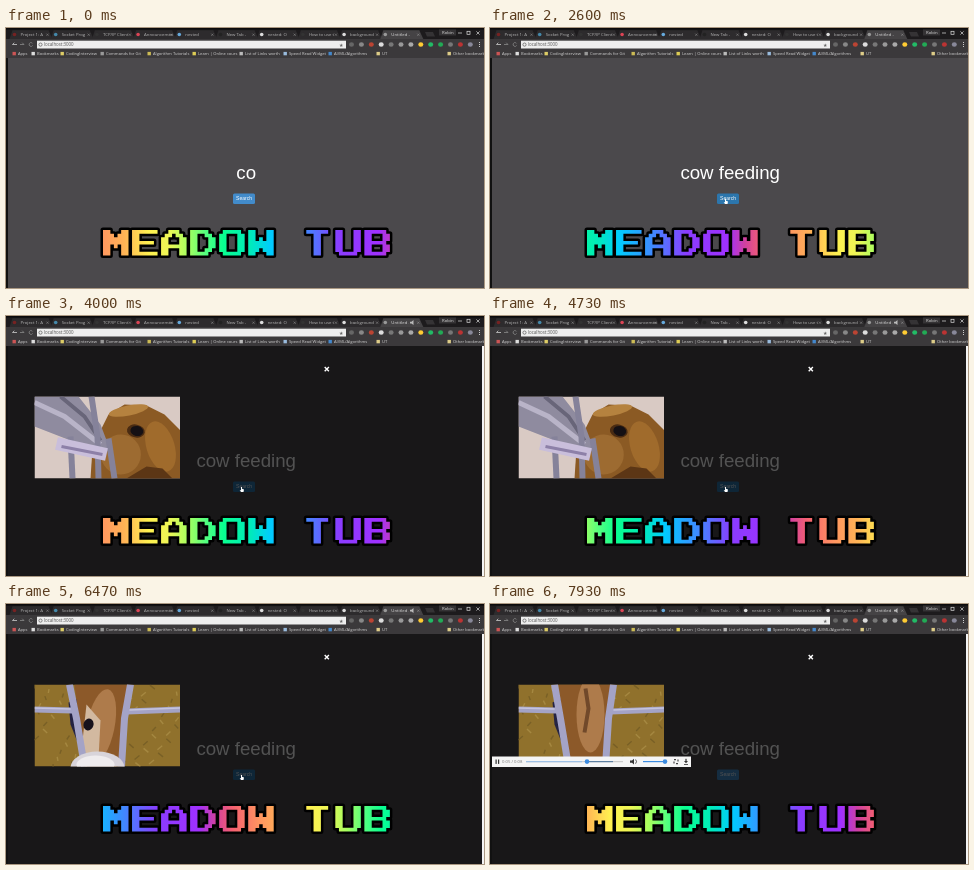
Write an HTML page with a canvas that moves like this. It is 478 by 260 pixels and loops after 8000 ms.

```html
<!DOCTYPE html>
<html lang="en">
<head>
<meta charset="utf-8">
<title>Search page</title>
<style>
html, body { margin: 0; width: 100%; height: 100%; overflow: hidden; background: #4b494c; }
canvas { display: block; width: 478px; height: 260px; }
</style>
</head>
<body>
<canvas id="stage" width="478" height="260"></canvas>
<script>
const ctx = document.getElementById('stage').getContext('2d');
const LOOP = 8000, FRAME = 200 / 3;
const SANS = '"Liberation Sans", Arial, sans-serif';
const UI = '"Open Sans", "Noto Sans", sans-serif';

const clamp = v => Math.max(0, Math.min(1, v));
const progress = (t, from, to) => clamp((t - from) / (to - from));
const ease = v => v * v * (3 - 2 * v);

function rect(x, y, w, h, color) {
  ctx.fillStyle = color;
  ctx.fillRect(x, y, w, h);
}
function ellipse(x, y, rx, ry, color, angle = 0) {
  ctx.fillStyle = color;
  ctx.beginPath();
  ctx.ellipse(x, y, rx, ry, angle, 0, 7);
  ctx.fill();
}
function polygon(points, color) {
  ctx.fillStyle = color;
  ctx.beginPath();
  points.forEach(p => ctx.lineTo(...p));
  ctx.fill();
}
function line(points, color, width = 1) {
  ctx.strokeStyle = color;
  ctx.lineWidth = width;
  ctx.beginPath();
  points.forEach(p => ctx.lineTo(...p));
  ctx.stroke();
}
function text(str, x, y, size, color, align = 'left', family = UI) {
  ctx.font = `${size}px ${family}`;
  ctx.textAlign = align;
  ctx.fillStyle = color;
  ctx.fillText(str, x, y);
}
function cross(x, y, r, color, width) {
  line([[x - r, y - r], [x + r, y + r]], color, width);
  line([[x - r, y + r], [x + r, y - r]], color, width);
}

// ---- Browser frame ----
const tabs = ['Project 1: A', 'Socket Prog', 'TCP/IP Client', 'Announcemen', 'nested',
  'New Tab - ', 'nested: O', 'How to use t', 'background', 'Untitled -'];
const tabIcons = ['#722', '#48a', '#333', '#d45', '#6ad', '#222', '#ddd', '#333', '#ddd', '#999'];
const bookmarks = [[12, 'Apps'], [31, 'Bookmarks'], [60, 'CodingInterview'], [100, 'Commands for Git'],
  [147, 'Algorithm Tutorials'], [192, 'Learn | Online cours'], [239, 'List of Links worth'],
  [283, 'Speed Read Widget'], [328, 'AI/ML/Algorithms'], [376, 'UT'], [447, 'Other bookmarks']];
const markIcons = ['#c55', '#ddd', '#dc6', '#999', '#cb5', '#dc5', '#bbb', '#9bd', '#48c', '#dc8', '#dc8'];
const toolIcons = ['#666', '#888', '#b43', '#ddd', '#777', '#999', '#aaa', '#fc3', '#2b6', '#2a5', '#777', '#b33', '#889'];

function drawTabShape(x, color) {
  polygon([[x - 4, 11], [x - 1, 2.3], [x + 35, 2.3], [x + 39, 11]], color);
}

function drawBrowser(t) {
  rect(0, 0, 478, 12, '#1d1b1d');
  rect(0, 0, 478, 1.5, '#0b0a0b');
  rect(0, 11, 478, 19, '#3b393b');
  polygon([[419, 4], [427, 4], [429, 8.5], [421, 8.5]], '#353335');
  rect(433, 1.5, 17, 6, '#353335');
  tabs.forEach((title, i) => {
    const x = 7.5 + i * 41.2, active = i === tabs.length - 1;
    drawTabShape(x, active ? '#454345' : '#2d2b2d');
    ellipse(x + 1, 6.5, 1.8, 1.8, tabIcons[i]);
    text(title, x + 7, 8.2, 4.3, active ? '#ddd' : '#b5b5b5');
    cross(x + 34, 6.7, 1.1, '#999', .5);
  });
  if (t > 3600) {
    rect(403, 3, 6, 7, '#454345');
    polygon([[404, 5.7], [405.5, 5.7], [407.5, 4], [407.5, 9], [405.5, 7.5], [404, 7.5]], '#bbb');
  }
  text('Robin', 436, 6.2, 4.3, '#ddd');
  line([[452, 5], [456, 5]], '#ddd', .7);
  ctx.strokeRect(461, 3.3, 3, 3);
  cross(472, 5, 1.6, '#ddd', .7);

  line([[11, 16.5], [6.5, 16.5], [8.3, 14.7]], '#ccc', .8);
  line([[14, 16.5], [18, 16.5], [16.2, 14.7]], '#888', .8);
  ctx.beginPath();
  ctx.arc(25, 16.5, 1.9, .5, 5.6);
  ctx.stroke();
  rect(31, 12.7, 309, 7.8, '#eee');
  ctx.strokeStyle = '#666';
  ctx.beginPath();
  ctx.arc(34.5, 16.6, 1.6, 0, 7);
  ctx.stroke();
  text('localhost:3000', 38, 18.2, 4.4, '#555');
  text('★', 333, 18.5, 5, '#666');
  toolIcons.forEach((color, i) => ellipse(345.5 + i * 9.9, 16.5, 2.5, 2.2, color));
  for (const y of [14, 16, 18]) rect(473, y, 1, 1, '#ccc');

  bookmarks.forEach(([x, label], i) => {
    rect(x - 5.5, 23.9, 3.4, 3.4, markIcons[i]);
    text(label, x, 27.3, 4.1, '#d5d5d5');
  });
}

// ---- Search form ----
const QUERY = 'cow feeding';

function drawForm(t) {
  const typed = QUERY.slice(0, 2 + Math.floor(t / 150));
  text(typed, 240.2, 151, 18.67, '#fff', 'center', SANS);
  if (t > 100 && t < 1900) {
    const end = 240.2 + ctx.measureText(typed).width / 2;
    rect(end, 133, .8, 22, '#ccc');
  }
  const hover = t > 2250 && t < 7250;
  ctx.fillStyle = hover ? '#2c76ad' : '#428bca';
  ctx.beginPath();
  ctx.roundRect(227, 165.5, 22, 10.5, 1.5);
  ctx.fill();
  text('Search', 238, 172.3, 5, '#fff', 'center', SANS);
}

function drawPointer(t) {
  if (t < 1950 || t > 7450) return;
  const arrive = ease(progress(t, 1950, 2300)), leave = ease(progress(t, 7200, 7450));
  const x = 256 - 21 * arrive - 90 * leave, y = 161 + 10 * arrive - 45 * leave;
  polygon([[x, y], [x + 1, y], [x + 1, y + 1.8], [x + 3, y + 2.6], [x + 2.5, y + 5],
    [x, y + 5], [x - 1.3, y + 3], [x, y + 3.2]], '#fff');
}

// ---- Pixel lettering with a travelling rainbow ----
const TITLE = 'MEADOW TUB', PIXEL = 3.63, WAVE = 340;
const glyphs = {
  M: [99, 119, 127, 127, 107, 99, 99],
  E: [127, 96, 96, 126, 96, 96, 127],
  A: [28, 54, 99, 99, 127, 99, 99],
  D: [124, 102, 99, 99, 99, 102, 124],
  O: [62, 99, 99, 99, 99, 99, 62],
  W: [99, 99, 107, 127, 127, 119, 99],
  T: [126, 24, 24, 24, 24, 24, 24],
  U: [99, 99, 99, 99, 99, 99, 62],
  B: [126, 99, 99, 126, 99, 99, 126],
};
const rainbow = [[0, '#ff9560'], [.07, '#ffb455'], [.14, '#fff050'], [.2, '#eef655'], [.26, '#a0ff60'],
  [.31, '#50ff80'], [.36, '#08ff90'], [.44, '#00eabb'], [.5, '#00ccff'], [.6, '#4088ff'], [.7, '#8a3cff'],
  [.82, '#a030ff'], [.87, '#d040a0'], [.92, '#f46070'], [1, '#ff9560']];

const titlePath = new Path2D();
[...TITLE].forEach((char, i) => (glyphs[char] || []).forEach((bits, row) => {
  for (let col = 0; col < 7; col++) {
    if (bits >> (6 - col) & 1) {
      titlePath.rect(97 + (i * 8 + col) * PIXEL, 202 + row * PIXEL, PIXEL + .1, PIXEL + .1);
    }
  }
}));

function drawTitle(t) {
  const start = 95 + (t / 1000 % 1 - 1) * WAVE;
  const gradient = ctx.createLinearGradient(start, 0, start + 2 * WAVE, 0);
  for (const cycle of [0, 1]) {
    rainbow.forEach(([at, color]) => gradient.addColorStop((at + cycle) / 2, color));
  }
  ctx.lineJoin = 'round';
  ctx.lineWidth = 5;
  ctx.strokeStyle = '#000';
  ctx.stroke(titlePath);
  ctx.fillStyle = gradient;
  ctx.fill(titlePath);
  ctx.lineJoin = 'miter';
}

// ---- Video ----
function drawCalf(t) {
  const sway = Math.sin(t / 260) * 1.2;
  rect(0, 0, 146, 82, '#d9cac4');
  polygon([[56, 82], [58, 52], [66, 34], [74, 18], [90, 8], [112, 9], [130, 18], [146, 34], [146, 82]], '#8b5a24');
  ellipse(86 + sway, 58, 20, 20, '#9d6b31', .4);
  ellipse(126, 50, 14, 26, '#a06b2c', -.3);
  ellipse(94, 14, 20, 5, '#b5823f', -.2);
  polygon([[92, 82], [112, 70], [128, 72], [138, 82]], '#5c3615');
  ellipse(101 + sway, 34.5, 9, 6.5, '#4a2b12', .2);
  ellipse(102 + sway, 34.5, 6.5, 5, '#151014', .2);
  polygon([[0, 0], [44, 0], [66, 28], [76, 54], [64, 56], [36, 44], [0, 30]], '#8f8b9f');
  line([[0, 6], [30, 20], [66, 48]], '#b9b4c8', 5);
  line([[26, 0], [50, 20], [66, 44]], '#686579', 4);
  line([[36, 40], [38, 82]], '#85829a', 6);
  line([[57, 0], [63, 40], [64, 82]], '#85829a', 6);
  line([[74, 42], [80, 82]], '#85829a', 6);
  line([[22, 47], [72, 58]], '#c9bedb', 13);
  line([[27, 50], [68, 58]], '#8d80a8', 3);
}

function drawFeeding(t) {
  const nod = Math.sin((t - 5470) / 2000 * Math.PI), down = Math.max(0, nod), up = Math.max(0, -nod);
  rect(0, 0, 146, 82, '#90712c');
  for (let i = 0; i < 70; i++) {
    const x = i * 47.3 % 146, y = i * 29.7 % 82;
    line([[x, y], [x + 5 * Math.sin(i), y + 4]], i % 2 ? '#a58841' : '#796026', 1.4);
  }
  polygon([[34, 18], [48, 12], [60, 40], [58, 72], [44, 60], [36, 40]], '#252342');
  polygon([[40, 0], [94, 0], [92 - down * 3, 50], [84, 82], [52, 82], [46, 48]], '#8c5929');
  ellipse(72 - down * 6, 30 + down * 12, 14, 38, '#ae7b4b', down * .2);
  if (down > .2) {
    ctx.globalAlpha = down;
    polygon([[52, 20], [66, 36], [64, 74], [46, 74]], '#d2b9a0');
    ellipse(54, 40, 5, 6, '#17121c', .3);
    ctx.globalAlpha = 1;
  }
  if (up > .1) {
    ctx.globalAlpha = up;
    line([[67, 4], [70, 24], [66, 48]], '#53301a', 4);
    ctx.globalAlpha = 1;
  }
  const bar = '#a4a3c6', light = '#c5c4de';
  const lean = 3 * Math.abs(nod);
  line([[0, 25], [38, 26]], bar, 6);
  line([[92, 27], [146, 25]], bar, 6);
  line([[38 - lean, 0], [42, 34], [50, 82]], bar, 7);
  line([[93 + lean, 0], [90, 34], [87, 82]], bar, 7);
  line([[0, 23.5], [36, 24.5]], light, 1.5);
  line([[95, 25.5], [146, 23.5]], light, 1.5);
  ellipse(67 - down * 4, 83 + up * 25, 27, 16, '#d8d4da');
  ellipse(65 - down * 4, 80 + up * 25, 19, 9, '#efecee');
}

function drawControls() {
  rect(2, 152.5, 199, 10.5, '#f5f5f5');
  rect(5.5, 155.5, 1.2, 4.4, '#333');
  rect(8, 155.5, 1.2, 4.4, '#333');
  text('0:05 / 0:08', 12, 159.4, 4.2, '#777');
  line([[36, 157.6], [133, 157.6]], '#ccc', 1.2);
  line([[36, 157.6], [92, 157.6]], '#9ec0e4', 1.2);
  line([[97, 157.6], [123, 157.6]], '#5d7fa0', 1.2);
  ellipse(97, 157.6, 2.3, 2.3, '#3c8be0');
  polygon([[140, 156.4], [142, 156.4], [144, 154.7], [144, 160.5], [142, 158.8], [140, 158.8]], '#333');
  line([[145.6, 155.5], [146.5, 157.6], [145.6, 159.7]], '#333', .8);
  line([[153, 157.6], [175, 157.6]], '#3c8be0', 1.2);
  ellipse(175, 157.6, 2.3, 2.3, '#3c8be0');
  ctx.strokeStyle = '#444';
  ctx.setLineDash([2, 2]);
  ctx.strokeRect(184, 155.6, 4, 4);
  ctx.setLineDash([]);
  polygon([[194, 157], [198, 157], [196, 159.3]], '#333');
  rect(195.4, 154.8, 1.2, 2.4, '#333');
  rect(194, 160, 4, .8, '#333');
}

function drawModal(t) {
  const shown = ease(progress(t, 3200, 3750));
  if (!shown) return;
  ctx.globalAlpha = shown;
  rect(2, 30, 474, 230, 'rgba(0, 0, 0, .68)');
  rect(476, 30, 2, 230, '#f4f4f4');
  ctx.globalAlpha = 1;
  if (shown < .5) return;
  cross(320.8, 53.2, 2.1, '#fff', 1.4);
  ctx.save();
  ctx.beginPath();
  ctx.rect(28.5, 80.5, 145.5, 82);
  ctx.clip();
  ctx.translate(28.5, 80.5);
  (t < 4900 ? drawCalf : drawFeeding)(t);
  ctx.restore();
  if (t > 7350) drawControls();
}

function draw(now) {
  const elapsed = now % LOOP;
  const t = Math.floor((elapsed + 5) / FRAME) * FRAME % LOOP;
  rect(0, 0, 478, 260, '#4b494c');
  drawForm(t);
  drawModal(t);
  drawTitle(t);
  drawPointer(t);
  rect(0, 30, 2, 230, '#111');
  drawBrowser(t);
}

let begin;
function tick(now) {
  begin ??= now;
  draw(now - begin);
  requestAnimationFrame(tick);
}
draw(0);
requestAnimationFrame(tick);
</script>
</body>
</html>
```
